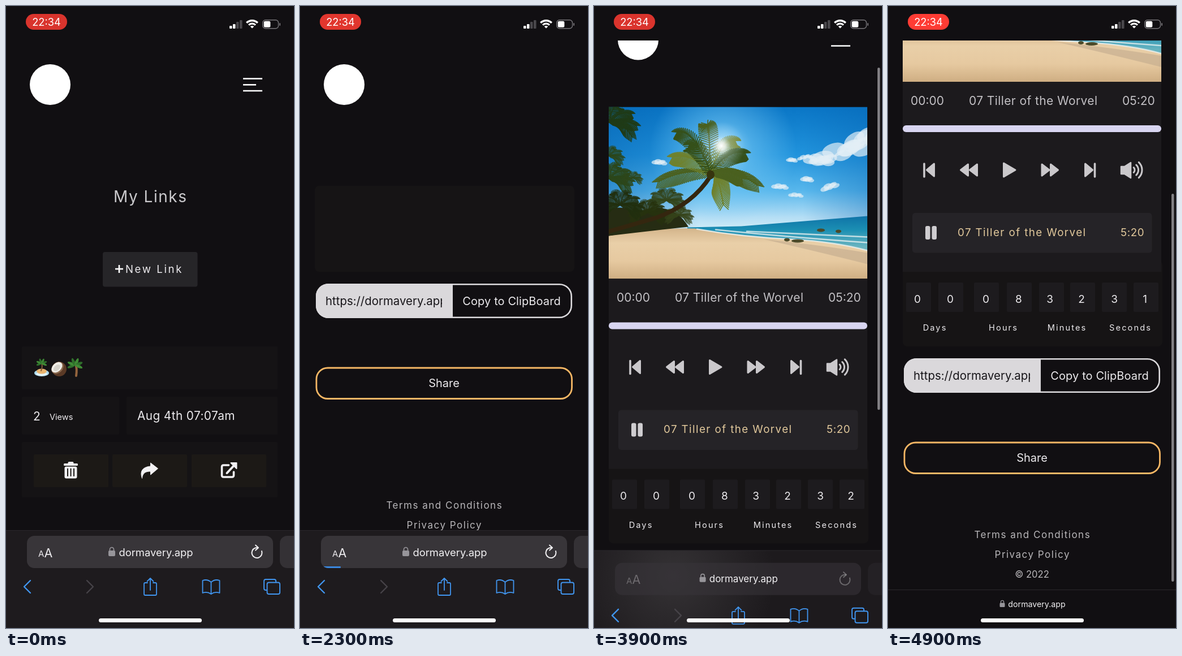
An HTML page with a canvas for the animation above (5000 ms loop, 509x1100 px).

```html
<!DOCTYPE html>
<html lang="en">
<head>
<meta charset="utf-8">
<title>Links</title>
<style>
html, body { margin: 0; width: 100%; height: 100%; overflow: hidden; background: #110f12; }
canvas { display: block; width: 509px; height: 1100px; }
</style>
</head>
<body>
<canvas id="stage"></canvas>
<script>
const W = 509, H = 1100, LOOP = 5000;
const BG = '#110f12', SITE = 'dormavery.app', SONG = '07 Tiller of the Worvel', BLUE = '#4196f0';
const canvas = document.getElementById('stage');
const dpr = window.devicePixelRatio || 1;
canvas.width = W * dpr;
canvas.height = H * dpr;
const c = canvas.getContext('2d');

const clamp = (v, a = 0, b = 1) => Math.min(b, Math.max(a, v));
const mix = (a, b, k) => a + (b - a) * k;
const ramp = (t, a, b) => clamp((t - a) / (b - a));
const smooth = k => k * k * (3 - 2 * k);

// Smooth curve through [time, value] points, resting at both ends.
function track(t, pts) {
  const n = pts.length - 1;
  if (t <= pts[0][0]) return pts[0][1];
  if (t >= pts[n][0]) return pts[n][1];
  let i = 0;
  while (t > pts[i + 1][0]) i++;
  const slope = j => j <= 0 || j >= n ? 0 :
    (pts[j + 1][1] - pts[j - 1][1]) / (pts[j + 1][0] - pts[j - 1][0]);
  const [t0, a] = pts[i], [t1, b] = pts[i + 1], d = t1 - t0, u = (t - t0) / d;
  return mix(a, b, smooth(u)) + d * u * (1 - u) * ((1 - u) * slope(i) - u * slope(i + 1));
}

function box(x0, y0, x1, y1, fill, r = 0) {
  c.fillStyle = fill;
  c.beginPath();
  c.roundRect(x0, y0, x1 - x0, y1 - y0, r);
  c.fill();
}
function frame(x0, y0, x1, y1, color, width, r) {
  c.strokeStyle = color;
  c.lineWidth = width;
  c.beginPath();
  c.roundRect(x0, y0, x1 - x0, y1 - y0, r);
  c.stroke();
}
function poly(points, fill, round = 0) {
  c.beginPath();
  points.forEach(([x, y]) => c.lineTo(x, y));
  c.closePath();
  c.fillStyle = c.strokeStyle = fill;
  c.fill();
  if (round) { c.lineWidth = round; c.lineJoin = 'round'; c.stroke(); }
}
function line(points, color, width, cap = 'round') {
  c.strokeStyle = color;
  c.lineWidth = width;
  c.lineCap = cap;
  c.lineJoin = 'round';
  c.beginPath();
  points.forEach(([x, y]) => c.lineTo(x, y));
  c.stroke();
}
function oval(x, y, rx, ry, fill, turn = 0) {
  c.fillStyle = fill;
  c.beginPath();
  c.ellipse(x, y, rx, ry, turn, 0, 7);
  c.fill();
}
function path(d, fill, stroke, width) {
  const p = new Path2D(d);
  if (fill) { c.fillStyle = fill; c.fill(p); }
  if (stroke) { c.strokeStyle = stroke; c.lineWidth = width; c.lineCap = c.lineJoin = 'round'; c.stroke(p); }
}
function fade(gradient, ...stops) {
  stops.forEach(([k, color]) => gradient.addColorStop(k, color));
  return gradient;
}
function glow(x, y, r, ...stops) {
  oval(x, y, r, r, fade(c.createRadialGradient(x, y, 0, x, y, r), ...stops));
}
function at(x, y, draw, scale = 1) {
  c.save();
  c.translate(x, y);
  c.scale(scale, scale);
  draw();
  c.restore();
}
// y is the middle of the capitals
function text(s, x, y, size, { color = '#eceaed', gap = 0, align = 'left' } = {}) {
  c.font = `400 ${size}px Inter, "Open Sans", sans-serif`;
  c.letterSpacing = gap + 'px';
  c.textAlign = align;
  c.fillStyle = color;
  c.fillText(s, x + (align === 'center' ? gap / 2 : 0), y + size * 0.36);
}
const mid = (s, x, y, size, o) => text(s, x, y, size, { align: 'center', ...o });

/* ---- small pictures ---- */
function frond(x, y, tx, ty, color, size) {
  const mx = (x + tx) / 2, my = Math.min(y, ty) - size * 0.5, rib = [];
  for (let k = 0; k <= 1.001; k += 0.035) {
    const px = (1 - k) ** 2 * x + 2 * k * (1 - k) * mx + k * k * tx;
    const py = (1 - k) ** 2 * y + 2 * k * (1 - k) * my + k * k * ty;
    const dir = Math.atan2(mix(my - y, ty - my, k), mix(mx - x, tx - mx, k));
    const len = size * (0.4 + 0.9 * Math.sin(Math.PI * clamp(k * 0.85 + 0.1)));
    rib.push([px, py]);
    [-0.75, 0.75].forEach(side => line(
      [[px, py], [px + Math.cos(dir + side) * len, py + Math.sin(dir + side) * len * 0.8 + len * 0.3]],
      color, size * 0.09));
  }
  line(rib, color, size * 0.12);
}
function crown(x, y, r, color) {
  for (let i = 0; i < 8; i++) {
    const a = Math.PI * (0.85 + i * 0.19);
    frond(x, y, x + Math.cos(a) * r, y + Math.sin(a) * r * 0.75 + r * 0.15, color, r * 0.27);
  }
}
function leafFan(x, y, r) {
  for (let i = 0; i < 6; i++) {
    const a = Math.PI * (0.88 + i * 0.25);
    oval(x + Math.cos(a) * r * 0.55, y + Math.sin(a) * r * 0.45, r * 0.55, r * 0.2,
      i % 2 ? '#3f8a35' : '#2f6f2b', a);
  }
}
function island() {
  oval(0, 8, 13, 6, '#a9d9ee');
  oval(0, 9.5, 10, 3.5, '#e4f4fa');
  oval(0, 5, 9, 4.5, '#e9b570');
  path('M-1 4Q2 -3 0 -9', null, '#86603c', 2);
  leafFan(0, -9, 9);
}
function coconut() {
  oval(1, 1, 13, 13, '#5b3a26');
  oval(-2, -1, 12, 9, '#8a6a50', -0.75);
  oval(-3, -2, 11, 7.5, '#f0eee8', -0.75);
  oval(-3, -1, 7, 4.5, '#d6d3cb', -0.75);
}
function palm() {
  path('M1 13Q3 0 0 -7', null, '#94643d', 4);
  leafFan(-1, -6, 13);
}
function leaves() {
  path('M-12 1Q-8 6 -3 9M-3 6Q-1 2 0 0', null, '#6e9c48', 1.5);
  path('M-9 12Q-2 1 11 10Q2 16 -9 12Z', '#5f9f42');
  path('M0 1Q-2 -9 12 -13Q13 0 0 1Z', '#4d8b39');
  path('M-10 -1Q-5 -1 -8 8M13 -9Q14 2 6 5', null, '#7ba85a', 1.3);
}
function trio(x, y) {
  at(x, y, island);
  at(x + 30, y, coconut);
  at(x + 60, y, palm);
}
function trash() {
  box(-12.5, -12, 12.5, -8, '#f2f1f3', 1.5);
  box(-5, -15, 5, -10, '#f2f1f3', 2);
  box(-11, -6.5, 11, 14.5, '#f2f1f3', 3);
  [-5.5, 0, 5.5].forEach(x => line([[x, -2.5], [x, 10]], '#1c1916', 2));
}
function arrow() {
  path('M-13 14C-18 0 -10 -6 2 -7L2 -13L15 -3L2 8L2 2C-6 2 -12 4 -13 14Z', '#f2f1f3', '#f2f1f3', 1);
}
function external() {
  path('M0 -9H-9Q-12 -9 -12 -6V9Q-12 12 -9 12H6Q9 12 9 9V3', null, '#f2f1f3', 3.6);
  line([[-3, 5], [10, -9]], '#f2f1f3', 4);
  poly([[4, -13], [14, -13], [14, -3]], '#f2f1f3', 2);
}
function lock() {
  box(-6, -2, 6, 8, '#97959a', 2);
  path('M-3.5 -1V-4A3.5 3.5 0 0 1 3.5 -4V-1', null, '#97959a', 1.7);
}

/* ---- pages ---- */
function header(menu) {
  oval(78, 139, 36, 36, '#ffffff');
  if (menu) [[128.5, 453], [139.3, 442], [150, 453]].forEach(([y, x]) => line([[419, y], [x, y]], '#fff', 2.6, 'butt'));
}
function card(y, o) {
  const split = o.split || 200;
  if (o.panel) {
    box(28, y, 480, y + 76, o.panel, 2);
    box(28, y + 89, split, y + 156, o.panel, 2);
    box(split + 13, y + 89, 480, y + 156, o.panel, 2);
    box(28, y + 169, 480, y + 267, o.panel, 2);
  }
  o.title(y + 39);
  text(o.views, 48, y + 123, 21);
  text('Views', o.viewsX || 77, y + 125, 14.6);
  text('Aug 4th ' + o.time, o.dateX, y + 123, 20.8, { gap: 0.4 });
  [[49, trash], [188, arrow], [328, external]].forEach(([x, icon]) => {
    box(x, y + 191, x + 132, y + 249, o.button, 2);
    at(x + 65.5, y + 219, icon);
  });
}
function listPage() {
  header(true);
  mid('My Links', 254.5, 337, 28, { color: '#cac9cc', gap: 1.5 });
  box(171, 435, 338.5, 496.5, '#262528', 4);
  line([[193, 465], [207, 465]], '#fff', 2.6, 'butt');
  line([[200, 458], [200, 472]], '#fff', 2.6, 'butt');
  text('New Link', 211, 465.5, 18.6, { gap: 2.6 });
  card(602, { panel: '#151315', button: '#1c1916', views: '2', time: '07:07am', dateX: 232, title: y => trio(63, y) });
  card(912.5, { button: '#1d1617', views: '5', time: '12:00am', dateX: 234.5,
    title: y => { text('LULLEN', 48, y, 25, { gap: 0.6 }); trio(173, y); } });
  card(1223, { panel: '#151315', button: '#1c1916', views: '18', viewsX: 85, split: 206, time: '12:00am', dateX: 239,
    title: y => at(63, y, leaves) });
}

function cloud(x, y, rx, ry, turn) {
  for (let i = 0; i < 7; i++) {
    const k = i / 3 - 1, dx = k * rx * 0.8, dy = Math.sin(i * 2.4) * ry * 0.45;
    const r = ry * (0.5 + 0.35 * Math.abs(Math.cos(i * 1.7)));
    oval(x + dx * Math.cos(turn) - dy * Math.sin(turn), y + dx * Math.sin(turn) + dy * Math.cos(turn),
      r * 1.5, r * 0.85, '#e4eff6b0', turn);
  }
}
function photo() {
  c.save();
  c.beginPath();
  c.rect(26, 258, 457, 304);
  c.clip();
  box(26, 258, 483, 480, fade(c.createLinearGradient(0, 258, 0, 470),
    [0, '#0a76c6'], [0.4, '#2193dc'], [0.7, '#58b7ec'], [0.92, '#b4def5'], [1, '#cbe9f6']));
  box(26, 258, 483, 480, fade(c.createLinearGradient(26, 0, 483, 0),
    [0, '#045fae70'], [0.35, '#045fae00'], [0.75, '#045fae00'], [1, '#045fae50']));
  glow(228, 335, 130, [0, '#a8e0fc'], [0.4, '#7cccf680'], [1, '#7cccf600']);
  [[438, 338, 46, 17, -0.3], [398, 352, 20, 10, 0], [470, 318, 28, 16, -0.6], [372, 347, 11, 4, -0.3], [350, 352, 7, 4, 0],
   [329, 399, 12, 5, 0], [357, 414, 11, 4, 0], [377, 386, 8, 5, 0], [417, 399, 13, 6, -0.4], [116, 356, 10, 5, 0]]
    .forEach(a => cloud(...a));

  poly([[165, 471], [260, 469], [483, 451], [483, 540], [165, 478]],
    fade(c.createLinearGradient(0, 452, 0, 505), [0, '#0f74a8'], [0.45, '#1c8fb3'], [1, '#68b4c0']));
  path('M26 486Q110 471 178 473Q260 487 350 492Q430 497 483 512V562H26Z',
    fade(c.createLinearGradient(0, 472, 0, 562), [0, '#d3b48a'], [0.3, '#e9cfa8'], [0.65, '#e6c9a0'], [1, '#cfae83']));
  path('M300 492Q400 502 483 516V536Q400 515 300 492Z', '#bfa98c90');
  path('M182 474Q262 488 350 492Q430 497 483 512M215 475Q330 487 483 498M270 478Q400 484 483 488', null, '#eef4f2c0', 2.6);
  [[341, 493, 5], [360, 495, 11], [401, 476, 7], [432, 478, 5]].forEach(([x, y, r]) => oval(x, y, r, 3, '#4b4a2a'));

  path('M26 440Q50 430 75 445Q105 432 125 438Q150 442 167 470Q110 476 26 486Z', '#262c13');
  [[128, 424, 32, '#33441a'], [95, 445, 32, '#27330f'], [150, 450, 24, '#36441b'], [26, 285, 50, '#1f3a16'],
   [26, 385, 42, '#2b461a'], [68, 384, 17, '#30481d'], [46, 432, 38, '#212f0f'], [26, 345, 26, '#2b461a']]
    .forEach(a => crown(...a));
  path('M20 480Q70 466 110 454Q175 430 206 380', null, '#34260f', 7.5);
  [[112, 391], [138, 347], [146, 303], [200, 290], [250, 318], [268, 340], [291, 398], [229, 433], [168, 325], [262, 385]]
    .forEach(([x, y], i) => frond(206, 375, x, y, ['#4a601f', '#6f812c', '#35501a'][i % 3], 19));
  oval(206, 378, 7, 8, '#37340f');
  glow(225, 327, 42, [0, '#ffffff'], [0.16, '#fbfeffd0'], [0.4, '#dff3ff50'], [1, '#d8f0ff00']);
  c.restore();
}

function controls() {
  const k = '#cac8cb', tri = (x, w, h, dir) => poly([[x, 718 - h], [x + w * dir, 718], [x, 718 + h]], k, 3);
  line([[64, 707], [64, 730]], k, 3.6);
  tri(81.5, 13, 11, -1);
  tri(141.5, 13, 10, -1);
  tri(157.5, 13, 10, -1);
  tri(204.5, 20.5, 12, 1);
  tri(272, 13, 10, 1);
  tri(287.5, 13, 10, 1);
  tri(348.5, 13, 11, 1);
  line([[365.5, 707], [365.5, 730]], k, 3.6);
  poly([[412, 712], [418, 712], [429, 705], [429, 732], [418, 725], [412, 725]], k, 2.5);
  [6, 12.5, 19].forEach(r => {
    c.beginPath();
    c.arc(430, 718, r, -0.8, 0.8);
    c.lineWidth = 3;
    c.stroke();
  });
}
function player() {
  photo();
  box(26, 562, 483, 898, '#1c1a1d');
  const grey = { color: '#c3c1c5' };
  text('00:00', 40, 595, 21, grey);
  mid(SONG, 256.5, 595, 21, { ...grey, gap: 0.4 });
  text('05:20', 414, 595, 21, grey);
  box(26, 639, 483, 651, '#d8d5f1', 6);
  controls();
  box(43, 794, 466.5, 864.5, '#252327', 5);
  box(66, 817, 74.5, 841, '#cfcdd0', 3);
  box(77.5, 817, 86, 841, '#cfcdd0', 3);
  text(SONG, 123, 828, 18.8, { color: '#e2c99c', gap: 1.4 });
  text('5:20', 411, 828, 18.8, { color: '#e2c99c', gap: 0.6 });
}
function countdown(seconds) {
  const left = [32, 89, 152, 210, 267, 322, 378, 434], middle = [52, 110, 173, 231, 286, 342, 400, 454];
  [...('000832' + seconds)].forEach((d, i) => {
    box(left[i], 917, left[i] + 44, 969, '#1d1b1e', 2);
    mid(d, middle[i], 946, 19);
  });
  ['Days', 'Hours', 'Minutes', 'Seconds'].forEach((s, i) =>
    mid(s, [82, 203, 315.5, 427.5][i], 997, 14.6, { gap: 2.1 }));
}
function footer(drop) {
  c.save();
  c.beginPath();
  c.roundRect(28, 1051, 453, 61, 22);
  c.clip();
  box(28, 1051, 270, 1112, '#dad8db');
  c.beginPath();
  c.rect(40, 1051, 211, 61);
  c.clip();
  text('https://' + SITE, 45, 1082, 20.4, { color: '#18161a' });
  c.restore();
  frame(29.3, 1052.3, 479.7, 1110.7, '#dcdadd', 2.6, 21);
  mid('Copy to ClipBoard', 374, 1082, 20, { gap: 0.1 });
  frame(29, 1200, 480.5, 1254.5, '#f6b765', 2.8, 20);
  mid('Share', 254.5, 1227, 20);
  const o = { color: '#b9b7ba', gap: 1.5 };
  mid('Terms and Conditions', 254.5, 1363 + drop, 17, o);
  mid('Privacy Policy', 254.5, 1398 + drop, 17, o);
  mid('© 2022', 254.5, 1433 + drop, 16.6, { ...o, gap: 0 });
}
function linkPage(t) {
  const loaded = t >= 2700;
  header(t >= 2500);
  c.save();
  if (!loaded) c.translate(0, -560);
  box(26, 878, 485, 1030, '#161415', 8);
  if (loaded) player();
  if (t >= 3100) countdown(t < 4200 ? '32' : '31');
  footer(loaded ? 0 : 80);
  c.restore();
}

/* ---- phone chrome ---- */
function statusBar(t) {
  box(0, 0, W, 61, BG);
  const k = (1 - Math.cos(t * Math.PI / 1000)) / 2;
  box(35, 14, 108, 42, `rgb(${mix(217, 255, k)},${mix(52, 60, k)},${mix(45, 52, k)})`, 14);
  mid('22:34', 71.5, 28, 18.3, { color: '#fff' });
  [5, 8, 12, 15].forEach((h, i) => box(395 + i * 6, 40 - h, 399.5 + i * 6, 40, i < 2 ? '#fff' : '#4a484c', 1));
  c.strokeStyle = '#fff';
  c.lineCap = 'butt';
  [[13.8, 3.4], [8.4, 3.2], [2.3, 4.6]].forEach(([r, w]) => {
    c.lineWidth = w;
    c.beginPath();
    c.arc(435, 39.5, r, -2.36, -0.78);
    c.stroke();
  });
  frame(453.7, 24.7, 481.5, 39.8, '#777579', 1.4, 5);
  box(455.7, 26.7, 467.3, 37.8, '#fff', 2.5);
  box(483.2, 30, 485, 35, '#777579', 1);
}
function navIcons() {
  path('M43 1016L32 1027L43 1038', null, BLUE, 2.4);
  path('M143 1016L154 1027L143 1038', null, '#464348', 2.4);
  path('M250 1020H246Q244 1020 244 1022V1040Q244 1042 246 1042H264Q266 1042 266 1040V1022Q266 1020 264 1020H260' +
    'M255 1033V1012M249.5 1017.5L255 1012L260.5 1017.5', null, BLUE, 1.8);
  path('M362.5 1019V1040M362.5 1019Q356 1013 347.5 1016V1038Q356 1035 362.5 1040' +
    'Q369 1035 377.5 1038V1016Q369 1013 362.5 1019', null, BLUE, 1.8);
  path('M461 1033H459Q456 1033 456 1030V1017Q456 1014 459 1014H474Q477 1014 477 1017V1019', null, BLUE, 1.9);
  frame(461.5, 1019.5, 484, 1040, BLUE, 1.9, 3);
}
// p: 0 open, 1 collapsed; tint: light page parts showing through the blur
function toolbar(p, load, loadAlpha, tint) {
  const top = mix(927, 1032, p), tone = (a, b) => Math.round(mix(a, b, p * p));
  c.save();
  c.beginPath();
  c.rect(0, top, W, H - top);
  c.clip();
  box(0, top, W, H, `rgb(${tone(30, 17)},${tone(27, 15)},${tone(30, 18)})`);
  if (tint) glow(140, 1120 - 330 * p, 180, [0, `rgba(110,108,110,${0.45 * (1 - p)})`], [1, 'rgba(110,108,110,0)']);
  c.restore();
  box(0, top, W, top + 1, '#2b282c');

  if (p < 1) {
    const shown = clamp(1 - p * 2);
    c.save();
    c.translate(0, 141 * p);
    c.globalAlpha = mix(0.35, 1, shown);
    box(37, 937, 472, 994, '#383539', 13);
    c.globalAlpha = shown;
    box(484, 937, 530, 994, '#343135', 13);
    text('A', 57, 968.5, 15);
    text('A', 67.5, 967, 21.5);
    c.lineWidth = 2;
    c.lineCap = 'round';
    c.strokeStyle = '#f0eff1';
    c.beginPath();
    c.arc(443.5, 967, 9, -0.35, 4.9);
    c.stroke();
    path('M441 953.5L446 958L441 962.5', null, '#f0eff1', 2);
    if (load > 0 && loadAlpha > 0) {
      c.beginPath();
      c.roundRect(37, 937, 435, 57, 13);
      c.clip();
      c.globalAlpha = loadAlpha;
      box(37, 991, 37 + 435 * load, 994, '#3a87de');
    }
    c.restore();
    c.save();
    c.translate(0, 150 * p);
    navIcons();
    c.restore();
  }
  const y = 966 + 92 * Math.pow(p, 0.63), size = mix(18.4, 14.2, p);
  mid(SITE, mix(265, 263, p), y, size, { color: '#f2f1f3' });
  at(mix(187, 202, p), y - 1, lock, mix(1, 0.75, p));
  box(164, 1083, 346, 1090, '#fff', 3.5);
}
function scrollMark(top, len, alpha) {
  c.globalAlpha = alpha;
  box(501, top, 505.5, top + len, '#828084', 2.3);
  c.globalAlpha = 1;
}

function draw(t) {
  c.setTransform(dpr, 0, 0, dpr, 0, 0);
  box(0, 0, W, H, BG);
  const list = t < 2200;
  const s = list
    ? track(t, [[50, 0], [200, 36], [300, 98], [500, 232], [700, 305], [850, 319]])
    : track(t, [[3650, 0], [3800, 22], [3900, 79], [4200, 242], [4500, 366], [4700, 408], [4900, 428]]);
  let p = clamp((s - 44) / 105);
  if (list) p *= 1 - smooth(ramp(t, 1880, 2080));

  c.save();
  c.translate(0, -s);
  if (list) listPage(); else linkPage(t);
  c.restore();

  if (list) scrollMark(58 + s * 0.16, mix(130, 150, p), ramp(t, 60, 160) * (1 - ramp(t, 1000, 1200)));
  else scrollMark(58 + s * 0.64, mix(564, 686, p), ramp(t, 3660, 3780));
  statusBar(t);
  const load = t < 2300 ? 0.08 * ramp(t, 1950, 2100) : mix(0.08, 1, smooth(ramp(t, 2350, 2950)));
  toolbar(p, load, 1 - ramp(t, 2930, 3130), t >= 2700);
}

const start = performance.now();
function tick() {
  draw((performance.now() - start) % LOOP);
  requestAnimationFrame(tick);
}
tick();
</script>
</body>
</html>
```
